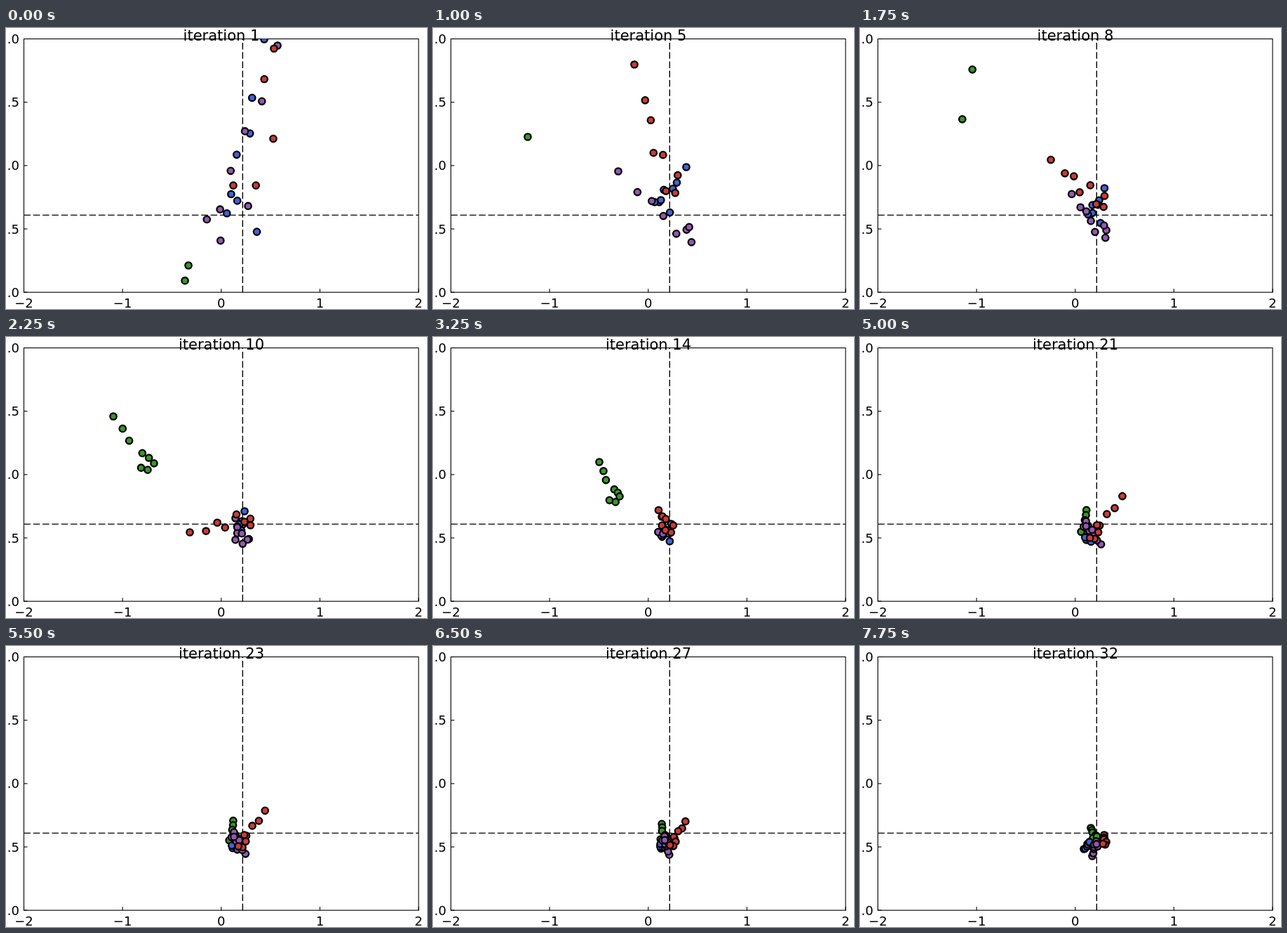
Animation of 600x400 px, one loop 8000 ms. Source, as an HTML page with a canvas:

```html
<!DOCTYPE html>
<html lang="en">
<head>
<meta charset="utf-8">
<title>Particle swarm</title>
<style>
  html, body { margin: 0; width: 100%; height: 100%; overflow: hidden; background: #fff; }
  canvas { display: block; width: 600px; height: 400px; }
</style>
</head>
<body>
<canvas id="stage" width="600" height="400"></canvas>
<script>
const ctx = document.getElementById('stage').getContext('2d');
const STEP_MS = 250, STEPS = 32, SWARM_SIZE = 8;
const plot = { left: 25.5, top: 15.5, right: 588, bottom: 376.2 };
const goal = { x: 337.3, y: 266.4 };

// The swarms tighten from one stage to the next.
const stages = [
  { iteration: 1, scatter: 36 },
  { iteration: 5, scatter: 18 },
  { iteration: 10, scatter: 13 },
  { iteration: 18, scatter: 8 },
  { iteration: 32, scatter: 4 }
];

// Per stage, a trail from the swarm's outlier to its dense end: x1, y1, x2, y2.
const swarms = [
  { color: '#389826', trails: [
    [260, 338, 250, 440], [135, 155, 200, -600], [153, 113, 206, 186],
    [321, 243, 318, 278], [329, 259, 336, 273]
  ] },
  { color: '#4063d8', trails: [
    [368, 16, 315, 300], [361, 198, 316, 266], [340, 248, 331, 290],
    [339, 284, 319, 295], [319, 289, 327, 283]
  ] },
  { color: '#9558b2', trails: [
    [387, 25, 305, 285], [264, 204, 368, 296], [327, 258, 337, 288],
    [347, 294, 318, 262], [331, 299, 337, 280]
  ] },
  { color: '#cb3c33', trails: [
    [520, -400, 330, 210], [287, 52, 335, 225], [262, 278, 342, 258],
    [381, 215, 324, 284], [348, 269, 347, 280]
  ] }
];

const lerp = (a, b, t) => a + (b - a) * t;
const easeOut = t => 1 - (1 - t) ** 2;

function noise(seed) {
  const v = Math.sin(seed * 127.1 + 11.7) * 43758.5453;
  return v - Math.floor(v);
}

function line(x1, y1, x2, y2) {
  ctx.beginPath();
  ctx.moveTo(x1, y1);
  ctx.lineTo(x2, y2);
  ctx.stroke();
}

function label(text, x, y, size, align) {
  ctx.font = `${size}px "DejaVu Sans", sans-serif`;
  ctx.textAlign = align;
  ctx.fillStyle = '#000';
  ctx.fillText(text, x, y);
}

function dot(x, y, color) {
  ctx.beginPath();
  ctx.arc(x, y, 4.7, 0, Math.PI * 2);
  ctx.fillStyle = color;
  ctx.fill();
  ctx.stroke();
}

function drawAxes() {
  const width = plot.right - plot.left, height = plot.bottom - plot.top;
  ctx.strokeStyle = '#000';
  ctx.lineWidth = 1.1;
  ctx.strokeRect(plot.left, plot.top, width, height);
  for (let i = 0; i < 5; i++) {
    const x = plot.left + width * i / 4;
    const y = plot.bottom - height * i / 4;
    line(x, plot.bottom, x, plot.bottom - 5);
    line(plot.left, y, plot.left + 5, y);
    label(String(i - 2).replace('-', '\u2212'), x, 397.5, 18, 'center');
    label(i % 2 ? '.5' : '.0', 19, y + 6.5, 18, 'right');
  }
  ctx.lineWidth = 1.4;
  ctx.setLineDash([9.5, 3.8]);
  line(plot.left, goal.y, plot.right, goal.y);
  line(goal.x, plot.bottom, goal.x, plot.top);
  ctx.setLineDash([]);
}

function drawSwarm({ color, trails }, swarmIndex, stage, mix) {
  const [x1, y1, x2, y2] = trails[stage].map((v, k) => lerp(v, trails[stage + 1][k], mix));
  const scatter = lerp(stages[stage].scatter, stages[stage + 1].scatter, mix);
  for (let i = 0; i < SWARM_SIZE; i++) {
    const along = easeOut(i / (SWARM_SIZE - 1));
    const seed = swarmIndex * SWARM_SIZE + i;
    const angle = 2 * Math.PI * noise(seed);
    const radius = scatter * along * lerp(0.4, 1.2, noise(seed + 0.5));
    dot(lerp(x1, x2, along) + radius * Math.cos(angle),
        lerp(y1, y2, along) + radius * Math.sin(angle), color);
  }
}

function drawSwarms(iteration) {
  let stage = 0;
  while (stage < stages.length - 2 && iteration >= stages[stage + 1].iteration) stage++;
  const start = stages[stage].iteration;
  const mix = (iteration - start) / (stages[stage + 1].iteration - start);

  ctx.save();
  ctx.beginPath();
  ctx.rect(plot.left, plot.top, plot.right - plot.left, plot.bottom - plot.top);
  ctx.clip();
  ctx.lineWidth = 2.3;
  swarms.forEach((swarm, index) => drawSwarm(swarm, index, stage, mix));
  ctx.restore();
}

function render(now) {
  const iteration = Math.floor(now / STEP_MS) % STEPS + 1;
  ctx.fillStyle = '#fff';
  ctx.fillRect(0, 0, 600, 400);
  drawAxes();
  drawSwarms(iteration);
  label(`iteration ${iteration}`, 307, 18, 21, 'center');
  requestAnimationFrame(render);
}

render(0);
</script>
</body>
</html>
```
